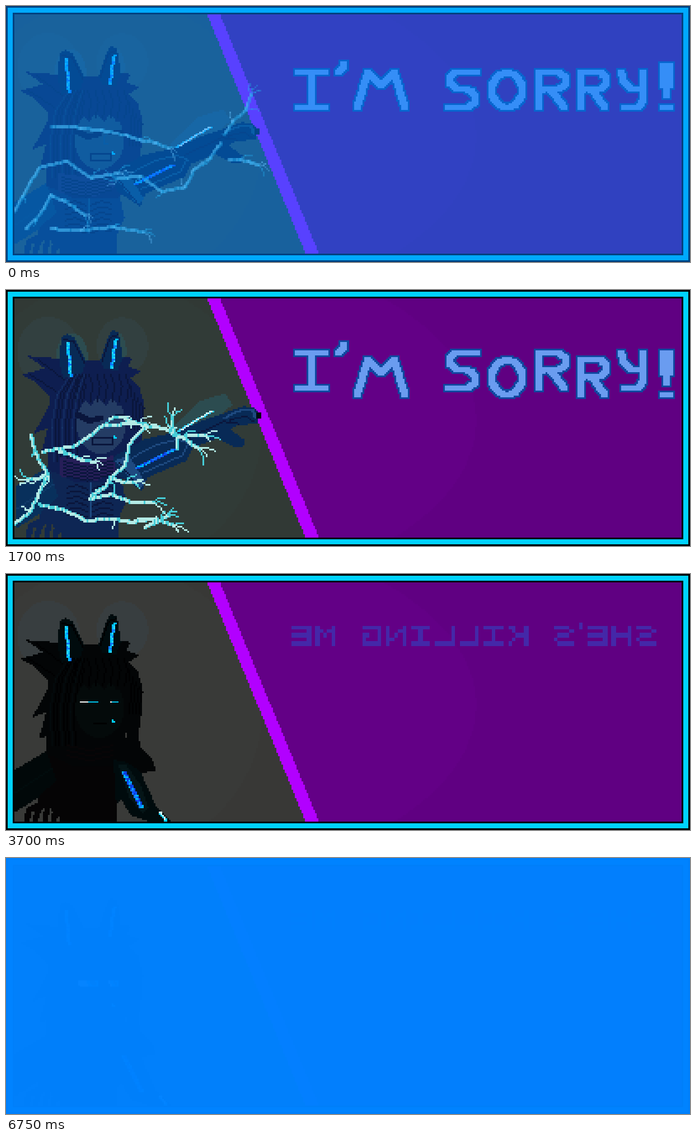
Recreate the animation shown at these times as an HTML page with a canvas. Size 1222x458 px, loop 6.85 s.

```html
<!DOCTYPE html>
<html lang="en">
<head>
<meta charset="utf-8">
<title>I'm sorry!</title>
<style>
html, body { margin: 0; width: 100%; height: 100%; overflow: hidden; background: #000; }
canvas { display: block; width: 1222px; height: 458px; image-rendering: pixelated; }
</style>
</head>
<body>
<canvas id="stage" width="407" height="153" role="img" aria-label="I'M SORRY! / SHE'S KILLING ME"></canvas>
<script>
const ctx = document.getElementById('stage').getContext('2d');
const W = 407, H = 153, LOOP = 6850, PX = 3;
let ox = 0, oy = 0; // drawing offset in stage pixels

// ---- pixel helpers: all coordinates are stage pixels, snapped to the art grid
function block(x, y, w, h, color) {
  ctx.fillStyle = color;
  ctx.fillRect(Math.round((x + ox) / PX), Math.round((y + oy) / PX), w, h);
}
function poly(p, color) {
  ctx.fillStyle = color;
  const n = p.length;
  for (let row = 0; row < H; row++) {
    const y = (row + 0.5) * PX - oy, xs = [];
    for (let i = 0; i < n; i += 2) {
      const x0 = p[i], y0 = p[i + 1], x1 = p[(i + 2) % n], y1 = p[(i + 3) % n];
      if ((y0 <= y) !== (y1 <= y)) xs.push(x0 + (y - y0) / (y1 - y0) * (x1 - x0));
    }
    xs.sort((a, b) => a - b);
    for (let i = 0; i + 1 < xs.length; i += 2) {
      const a = Math.round((xs[i] + ox) / PX), b = Math.round((xs[i + 1] + ox) / PX);
      ctx.fillRect(a, row, b - a, 1);
    }
  }
}
function ring(cx, cy, rx, ry) {
  const p = [];
  for (let i = 0; i <= 48; i++) {
    const a = i * Math.PI / 24;
    p.push(cx + rx * Math.cos(a), cy + ry * Math.sin(a));
  }
  return p;
}
const oval = (cx, cy, rx, ry, color) => poly(ring(cx, cy, rx, ry), color);
function walk(p, visit) {
  for (let i = 0; i + 3 < p.length; i += 2) {
    const dx = p[i + 2] - p[i], dy = p[i + 3] - p[i + 1];
    const n = Math.max(1, Math.ceil(Math.max(Math.abs(dx), Math.abs(dy)) / PX));
    for (let k = 0; k <= n; k++) visit(p[i] + dx * k / n, p[i + 1] + dy * k / n);
  }
}
function pen(p, w, h, color) {
  walk(p, (x, y) => block(x - w * PX / 2, y - h * PX / 2, w, h, color));
}
function random(seed) {
  let s = seed * 7919 + 17;
  const next = () => (s = (s * 16807) % 2147483647) / 2147483647;
  for (let i = 0; i < 9; i++) next();
  return next;
}
function speckle(p, size, colors, seed) {
  const rnd = random(seed);
  walk(p, (x, y) => {
    for (let i = 0; i < size; i++)
      block(x + (i - size / 2) * PX, y, 1, 1, colors[Math.floor(rnd() * colors.length)]);
  });
}

// ---- lighting moods
const MOODS = {
  faint: { wall: '#30403a', glow: '#324238', halo: '#32463e', aura: '#2e4c4c', hair: '#100f2a', dark: '#0a0a1e',
    skin: '#203640', arm: '#06142a', edge: '#123a50', body: '#0e1c38', scarf: '#1c1838', sleeve: '#0c2c44' },
  bright: { wall: '#323636', glow: '#333f3f', halo: '#304448', aura: '#28505a', hair: '#0f2846', dark: '#0a1c36',
    skin: '#2a4656', arm: '#08384e', edge: '#1c5870', body: '#123246', scarf: '#22284c', sleeve: '#08465e' },
  navy: { wall: '#313935', glow: '#313b37', halo: '#324040', aura: '#2c4c50', hair: '#0e1e50', dark: '#0a163c',
    skin: '#243c64', arm: '#082a56', edge: '#1e4a80', body: '#0e2654', scarf: '#261e58', sleeve: '#08305c' },
  night: { wall: '#383836', glow: '#393a38', halo: '#383e40', aura: '#383e40', hair: '#030506', dark: '#000001',
    skin: '#040a0a', arm: '#000b0d', edge: '#051517', body: '#050405', scarf: '#080506', sleeve: '#010809' }
};
const CYAN = '#00d2ff', ICE = '#d2fcff', PALE = '#b4ebe6', TEAL = '#46cdd7';
const GLOW = ['#00c8ff', '#00b4ff', '#28dcff', '#0a78ff'], DEEP = ['#0a50ff', '#1478ff', '#00b4ff', '#0a3cdc'];

// ---- backdrop
function backdrop(m) {
  ctx.fillStyle = m.wall;
  ctx.fillRect(0, 0, W, H);
  oval(190, 245, 268, 260, m.glow);
  oval(76, 110, 56, 62, m.halo);
  oval(208, 100, 46, 51, m.halo);
  poly([370, 12, 1210, 12, 1210, 446, 546, 446], '#600082');
  ctx.save();
  ctx.beginPath();
  ctx.moveTo(123, 4);
  ctx.lineTo(W, 4);
  ctx.lineTo(W, 149);
  ctx.lineTo(182, 149);
  ctx.clip();
  oval(200, 235, 640, 328, '#630086');
  ctx.restore();
  poly([358, 12, 381, 12, 560, 446, 536, 446], '#b200ff');
}
function frame() {
  [[0, 1, '#000'], [1, 3, CYAN], [4, 1, '#000']].forEach(([i, w, color]) => {
    ctx.fillStyle = color;
    ctx.fillRect(i, i, W - 2 * i, w);
    ctx.fillRect(i, H - i - w, W - 2 * i, w);
    ctx.fillRect(i, i, w, H - 2 * i);
    ctx.fillRect(W - i - w, i, w, H - 2 * i);
  });
}

// ---- figure
function head(m) {
  poly([84, 122, 35, 118, 66, 140, 25, 152, 46, 162, 74, 190, 74, 206, 47, 258, 72, 248, 59, 294, 72, 292,
    72, 322, 120, 345, 200, 345, 240, 312, 237, 288, 244, 236, 244, 205, 236, 176, 218, 158, 238, 146,
    214, 136, 223, 122, 205, 119, 160, 126, 140, 126], m.hair);
  poly([95, 92, 98, 82, 108, 79, 118, 84, 140, 126, 132, 150, 100, 158, 92, 128], m.arm);
  poly([165, 126, 179, 84, 186, 73, 198, 74, 206, 122, 196, 144, 172, 140], m.arm);
  pen([101, 88, 118, 92, 137, 130], 1, 1, m.dark);
  pen([168, 128, 183, 86, 196, 80], 1, 1, m.dark);
  oval(167, 240, 44, 54, m.skin);
  poly([106, 170, 128, 150, 200, 152, 226, 172, 232, 210, 214, 236, 208, 196, 198, 208, 186, 192, 176, 208,
    160, 190, 148, 208, 134, 192, 124, 226, 112, 216], m.hair);
  for (let i = 0; i < 8; i++) {
    const x = 78 + i * 6, b = 120 + i * 13, r = 216 + i * 3;
    pen([112 + i * 4, 152, x + 10, 188, x, 246, x + 5, 306], 1, 1, i % 3 ? m.dark : m.edge + '50');
    pen([b, 152, b + 6, 172, b + 1, 198], 1, 1, m.dark);
    pen([r, 168 + i * 5, r + 6, 210, r, 250], 1, 1, i % 2 ? m.dark : m.hair);
  }
  pen([56, 125, 100, 160], 1, 1, m.dark);
  pen([40, 152, 86, 180], 1, 1, m.dark);
}
function torso(m) {
  poly([15, 352, 72, 318, 110, 322, 104, 372, 15, 428], m.sleeve);
  pen([15, 392, 96, 338], 1, 1, m.edge + '60');
  poly([72, 318, 198, 320, 212, 380, 197, 412, 197, 446, 96, 446, 92, 420, 52, 420, 60, 396, 90, 372], m.body);
  for (let x = 37; x < 90; x += 16) pen([74, 408, x + 4, 424, x, 440], 3, 3, m.body);
}
function lights() {
  speckle([107, 93, 110, 120, 113, 152], 2, GLOW, 1);
  speckle([194, 87, 188, 116, 187, 138], 2, GLOW, 5);
  block(189, 262, 1, 2, CYAN);
  block(192, 265, 1, 1, CYAN);
}

function pointing(m) {
  oval(115, 118, 28, 40, m.aura);
  oval(196, 110, 16, 34, m.aura);
  poly([292, 250, 345, 198, 388, 185, 402, 205, 318, 275], m.aura);
  torso(m);
  head(m);
  pen([126, 224, 146, 234, 166, 230], 4, 3, m.dark);
  pen([187, 229, 206, 224], 3, 2, m.dark);
  pen([177, 232, 174, 247, 181, 248], 1, 1, m.edge);
  pen([152, 266, 187, 266, 187, 276, 152, 276, 152, 266], 1, 1, m.dark);
  poly([94, 300, 150, 308, 190, 296, 194, 324, 160, 342, 92, 334], m.scarf);
  for (let i = 0; i < 6; i++) {
    const y = 350 + i * 10, s = 308 + i * 6;
    if (i < 5) pen([100, s, 142, s + 10, 186, s - 2], 1, 1, m.dark);
    pen([106, y + 4, 124, y, 143, y + 7], 1, 1, m.dark);
    pen([151, y + 7, 170, y, 188, y + 4], 1, 1, m.dark);
  }
  pen([147, 346, 147, 406], 1, 1, m.edge);
  poly([188, 300, 244, 268, 296, 256, 360, 230, 420, 208, 440, 210, 450, 222, 446, 240, 410, 243, 398, 250,
    424, 270, 421, 282, 402, 281, 374, 266, 330, 284, 320, 306, 250, 336, 240, 360, 198, 332], m.arm);
  poly([192, 306, 216, 296, 246, 346, 236, 358], m.edge);
  pen([200, 310, 236, 354], 1, 1, m.dark);
  pen([222, 302, 262, 279, 304, 268, 324, 276, 312, 296, 240, 328], 1, 1, m.edge);
  pen([318, 268, 384, 236, 412, 240], 1, 1, m.dark);
  pen([386, 230, 414, 216, 438, 214, 443, 228], 2, 1, m.edge);
  pen([396, 234, 424, 226, 440, 236], 1, 1, m.dark);
  block(443, 220, 3, 4, '#000a14');
  speckle([231, 318, 299, 285], 3, DEEP, 8);
  pen([307, 253, 365, 216], 2, 1, '#28d2ff');
  pen([310, 251, 363, 216], 1, 1, ICE);
  lights();
}

function eye(x, w, iris) {
  poly([x, 222, x + 6, 213, x + w - 8, 213, x + w, 222, x + w, 232, x + 4, 232], '#fff');
  poly([iris, 221, iris + 5, 214, x + w - 7, 214, x + w, 222, x + w, 232, iris + 4, 232], '#00c3eb');
  poly([iris + 6, 220, x + w - 6, 220, x + w - 2, 229, iris + 9, 229], '#3c6e7d');
}
function eyes(open) {
  if (open <= 0) return;
  ctx.save();
  ctx.beginPath();
  ctx.rect(0, Math.round((232 - open * 19) / PX), W, H);
  ctx.clip();
  eye(128, 37, 144);
  eye(183, 19, 186);
  ctx.restore();
}
function resting(m, open) {
  torso(m);
  poly([232, 300, 262, 334, 268, 352, 246, 357, 200, 345, 196, 318], m.hair);
  head(m);
  pen([158, 268, 178, 269], 1, 1, m.dark);
  for (let y = 308; y < 330; y += 9) pen([110, y, 150, y + 9, 190, y], 1, 1, m.scarf);
  poly([192, 334, 212, 336, 240, 354, 268, 416, 296, 446, 262, 446, 222, 432, 206, 404, 197, 412], m.arm);
  poly([200, 342, 214, 342, 240, 378, 254, 420, 244, 430, 220, 400], m.edge);
  speckle([210, 353, 242, 416], 3, DEEP, 8);
  pen([275, 426, 286, 441], 2, 1, CYAN);
  pen([275, 426, 284, 440], 1, 1, ICE);
  block(213, 285, 1, 3, m.wall);
  block(237, 278, 1, 3, m.wall);
  lights();
  eyes(open);
}

// ---- lightning: a few anchor points per branch, kinks and twigs are seeded
const FADING = [[80, 215, 215, 232, 290, 255], [385, 245, 320, 325, 200, 310], [15, 370, 60, 290, 200, 300],
  [390, 230, 438, 160], [400, 275, 450, 285], [35, 400, 80, 340, 140, 375], [80, 400, 245, 405]];
const WIDE = [[178, 236, 250, 213, 325, 168], [255, 213, 310, 250], [15, 215, 40, 268, 185, 296, 255, 278],
  [60, 273, 26, 340], [15, 385, 100, 318, 190, 290], [185, 297, 180, 357], [45, 405, 215, 415, 320, 340],
  [262, 375, 328, 402], [365, 265, 405, 300, 420, 328], [403, 290, 438, 322], [80, 410, 48, 365]];
const CLOSE = [[185, 230, 245, 243, 345, 285], [65, 290, 235, 240], [305, 285, 298, 228], [45, 260, 75, 330, 15, 420],
  [95, 290, 155, 308], [245, 250, 185, 340, 150, 375, 262, 382], [60, 385, 190, 410, 300, 422],
  [250, 425, 290, 404], [185, 335, 228, 346], [75, 330, 42, 340], [300, 262, 355, 262]];

function kink(p, rnd) {
  const out = p.slice(0, 2);
  for (let i = 2; i < p.length; i += 2) {
    const dx = p[i] - p[i - 2], dy = p[i + 1] - p[i - 1];
    for (const f of [0.33, 0.67]) {
      const side = (rnd() - 0.5) * 0.22;
      out.push(p[i - 2] + dx * f - dy * side, p[i - 1] + dy * f + dx * side);
    }
    out.push(p[i], p[i + 1]);
  }
  return out;
}
function bolt(anchors, rnd) {
  const p = kink(anchors, rnd), n = p.length;
  const turn = Math.atan2(p[n - 1] - p[n - 3], p[n - 2] - p[n - 4]);
  const twig = (x, y, a, len) => {
    const mx = x + len / 2 * Math.cos(a), my = y + len / 2 * Math.sin(a);
    pen([x, y, mx, my, mx + len / 2 * Math.cos(a + 0.6), my + len / 2 * Math.sin(a + 0.6)], 1, 1, rnd() < 0.5 ? PALE : TEAL);
  };
  pen(p, 2, 2, TEAL);
  walk(p, (x, y) => { if (rnd() < 0.75) block(x - 3, y - 3, 1, 2, PALE); });
  for (let i = -1; i < 2; i++) twig(p[n - 2], p[n - 1], turn + i * 0.6 - 0.15, 14 + rnd() * 16);
  for (let i = 2; i < n - 2; i += 2)
    if (rnd() < 0.5) twig(p[i], p[i + 1], turn + (rnd() < 0.5 ? -0.9 : 0.9), 12 + rnd() * 14);
}
function lightning(step) {
  const kind = step % 3, rnd = random(kind + 3);
  ctx.globalAlpha = kind ? 1 : 0.35;
  for (const p of [FADING, WIDE, CLOSE][kind]) bolt(p, rnd);
  ctx.globalAlpha = 1;
}

// ---- lettering: strokes per letter, x from the letter's left, y from the cap line
const LETTERS = {
  I: [[0, 0, 48, 0], [24, 0, 24, 63], [0, 63, 48, 63]],
  "'": [[10, -17, 10, -10, 0, 0]],
  M: [[0, 63, 20, 0, 43, 22, 66, 0, 86, 63]],
  S: [[52, 0, 12, 0, 5, 8, 5, 19, 15, 28, 42, 32, 49, 40, 48, 53, 36, 62, 0, 62]],
  O: [ring(27, 31.5, 27, 31)],
  R: [[0, 62, 0, 0, 36, 0, 46, 8, 46, 21, 36, 29, 4, 31], [20, 31, 44, 62]],
  Y: [[0, 0, 5, 16, 17, 28, 39, 29], [39, 0, 39, 51, 30, 62, 5, 62]],
  '!': [[0, -14, 0, 23], [11, -14, 11, 23], [5, -14, 5, 41], [0, 62, 12, 62]]
};
const CRY = "I'MSORRY!", CRY_X = [523, 593, 626, 788, 867, 952, 1025, 1098, 1173], SINK = "I'SRY";
function cry(step) {
  const bob = -6 * Math.round(Math.sin(step * Math.PI / 2));
  [...CRY].forEach((c, i) => {
    const sign = SINK.includes(c) && i !== 6 ? 1 : -1;
    ox = CRY_X[i];
    oy = 119 + bob * sign;
    for (const p of LETTERS[c]) pen(p, 6, 5, '#0f48a0');
    for (const p of LETTERS[c]) pen(p, 4, 3, '#6a9cf0');
  });
  ox = oy = 0;
}

// five-by-five glyphs, one number per row of bits, written right to left
const FONT = { S: [15, 16, 14, 1, 30], H: [17, 17, 31, 17, 17], E: [31, 16, 31, 16, 31], K: [19, 18, 28, 18, 17],
  I: [31, 4, 4, 4, 31], L: [16, 16, 16, 16, 31], N: [17, 25, 21, 19, 17], G: [31, 16, 19, 17, 31], M: [17, 27, 21, 17, 17] };
function whisper() {
  const u = 7.1, snap = v => Math.round(v / PX);
  let right = 1160;
  ctx.fillStyle = '#4428a8';
  for (const c of "SHE'S KILLING ME") {
    if (c === "'") ctx.fillRect(snap(right - 6), snap(86), 2, 4);
    (FONT[c] || []).forEach((bits, row) => {
      for (let col = 0; col < 5; col++) {
        if (!(bits >> (4 - col) & 1)) continue;
        const x0 = snap(right - (col + 1) * u), x1 = snap(right - col * u);
        const y0 = snap(92 + row * u), y1 = snap(92 + (row + 1) * u);
        ctx.fillRect(x0, y0, x1 - x0, y1 - y0);
      }
    });
    right -= c === "'" ? 16 : c === ' ' ? 38 : 43.6;
  }
}

// ---- timeline: [time, value] keys that hold until the next one
const LIDS = [[0, 0], [3700, 0.2], [3750, 0.35], [3800, 0.5], [3900, 0.63], [4100, 0.35], [4150, 0], [4200, 0.35],
  [4300, 0.63], [4500, 0.8], [4550, 1], [6550, 0.63]];
const SHADE = [[0, 0], [2200, 0.33], [2300, 0.67], [2400, 1], [2900, 0.46], [3000, 0]];
const FLOOD = [[0, 0.5], [100, 0.25], [200, 0], [6550, 0.28], [6650, 0.65], [6750, 0.98]];
const held = (keys, t) => keys.reduce((v, k) => t >= k[0] ? k[1] : v, 0);

function veil(color, alpha, inset) {
  ctx.globalAlpha = alpha;
  ctx.fillStyle = color;
  ctx.fillRect(inset, inset, W - 2 * inset, H - 2 * inset);
  ctx.globalAlpha = 1;
}
function draw(t) {
  const step = Math.floor(t / 100), sorry = t < 2400;
  const mood = sorry ? [MOODS.faint, MOODS.bright, MOODS.navy][step % 3] : MOODS.night;
  backdrop(mood);
  if (sorry) {
    ox = step % 2 ? PX : 0;
    pointing(mood);
    ox = 0;
    lightning(step);
    cry(step);
  } else {
    resting(mood, held(LIDS, t));
    whisper();
  }
  frame();
  veil('#000', held(SHADE, t), 1);
  veil('#0082ff', held(FLOOD, t), 0);
}

let start = null, last = -1;
function tick(now) {
  if (start === null) start = now;
  const slot = Math.floor((now - start) % LOOP / 50);
  if (slot !== last) draw(slot * 50);
  last = slot;
  requestAnimationFrame(tick);
}
draw(0);
requestAnimationFrame(tick);
</script>
</body>
</html>
```
